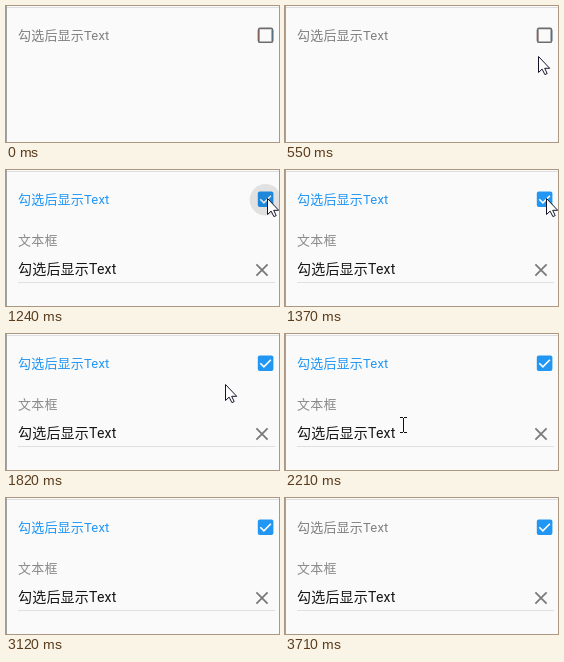
These frames come from a looping animation (273 px wide and 136 px high, 3810 ms). An HTML page:

```html
<!DOCTYPE html>
<html lang="zh-CN">
<head>
<meta charset="utf-8">
<title>Checkbox reveals text field</title>
<style>
  html, body { margin: 0; width: 100%; height: 100%; overflow: hidden; background: #fafafa; }
  svg { display: block; width: 273px; height: 136px; }
  text { font: 13px Roboto, "Noto Sans CJK SC", "Noto Sans CJK", sans-serif; letter-spacing: .2px; }
  .label, .ripple, .off, .on, .arrow, .beam { animation: 3810ms step-end infinite; }
  .label { fill: #808080; animation-name: label; }
  .caption { fill: #8a8a8a; }
  .value { font-size: 14px; fill: #161616; }
  .ripple { fill: #000; fill-opacity: .1; visibility: hidden; animation-name: ripple; }
  .off { animation-name: off; }
  .on { visibility: hidden; animation-name: on; }
  .arrow { visibility: hidden; animation-name: arrow; }
  .beam { visibility: hidden; animation-name: beam; }

  @keyframes label {
    0% { fill: #808080; }
    32.545% { fill: #2196f3; }
    97.375%, 100% { fill: #808080; }
  }
  @keyframes ripple {
    0% { visibility: hidden; }
    32.545% { visibility: visible; }
    35.958%, 100% { visibility: hidden; }
  }
  @keyframes off {
    0% { visibility: visible; }
    32.545%, 100% { visibility: hidden; }
  }
  @keyframes on {
    0% { visibility: hidden; }
    32.545%, 100% { visibility: visible; }
  }
  @keyframes arrow {
    0% { visibility: hidden; transform: translate(261px, 118px); }
    7.086% { visibility: visible; transform: translate(261px, 118px); }
    10.498% { visibility: visible; transform: translate(257px, 80px); }
    14.435% { visibility: visible; transform: translate(253px, 50px); }
    17.585% { visibility: visible; transform: translate(254px, 34px); }
    21.522% { visibility: visible; transform: translate(259px, 29px); }
    25.459% { visibility: visible; transform: translate(261px, 28px); }
    47.769% { visibility: visible; transform: translate(219px, 50px); }
    50.918% { visibility: visible; transform: translate(144px, 75px); }
    54.068% { visibility: hidden; transform: translate(144px, 75px); }
    78.477% { visibility: visible; transform: translate(196px, 120px); }
    81.889%, 100% { visibility: hidden; transform: translate(196px, 120px); }
  }
  @keyframes beam {
    0% { visibility: hidden; transform: translate(93px, 86px); }
    54.068% { visibility: visible; transform: translate(93px, 86px); }
    58.005% { visibility: visible; transform: translate(115px, 83px); }
    61.154% { visibility: visible; transform: translate(97px, 86px); }
    64.304% { visibility: visible; transform: translate(79px, 88px); }
    68.241% { visibility: visible; transform: translate(103px, 88px); }
    71.391% { visibility: visible; transform: translate(118px, 88px); }
    74.54% { visibility: visible; transform: translate(130px, 88px); }
    78.477%, 100% { visibility: hidden; transform: translate(130px, 88px); }
  }
</style>
</head>
<body>
<svg viewBox="0 0 273 136">
  <rect width="273" height="136" fill="#fafafa"/>
  <rect y="1" width="273" height="1" fill="#dedede"/>
  <rect width="1" height="136" fill="#a3a3a3"/>

  <text class="label" x="12" y="34">勾选后显示Text</text>

  <g class="off" fill="none" stroke-width="1.6">
    <rect x="252.6" y="22.4" width="13.9" height="13.9" rx="1.4" stroke="#6c6c6c"/>
    <path d="M252.6 24v11" stroke="#80645c"/>
    <path d="M266.5 24v11" stroke="#58717f"/>
  </g>

  <g class="on">
    <rect x="251.8" y="21.5" width="15.6" height="15.6" rx="2" fill="#2196f3"/>
    <path d="M254.3 29.2l3.6 3.6 7-7" fill="none" stroke="#fff" stroke-width="1.6"/>
    <text class="caption" x="12" y="75">文本框</text>
    <text class="value" x="12" y="104">勾选后显示Text</text>
    <rect x="12" y="112" width="257" height="1" fill="#e0e0e0"/>
    <path d="M250.4 94.4l11.2 11.2M261.6 94.4l-11.2 11.2" stroke="#7a7a7a" stroke-width="1.8"/>
  </g>

  <circle class="ripple" cx="259.5" cy="29.8" r="15.8"/>

  <path class="arrow" d="M.5 .5v16l3.6-3.4 2.8 5.5 2.3-1-2.5-5.3h5z" fill="#fff" stroke="#15152a"/>
  <path class="beam" d="M0 0h3v1h1v-1h3v1h-3v14h3v1h-3v-1h-1v1h-3v-1h3v-14h-3z" fill="#111"/>
</svg>
</body>
</html>
```
